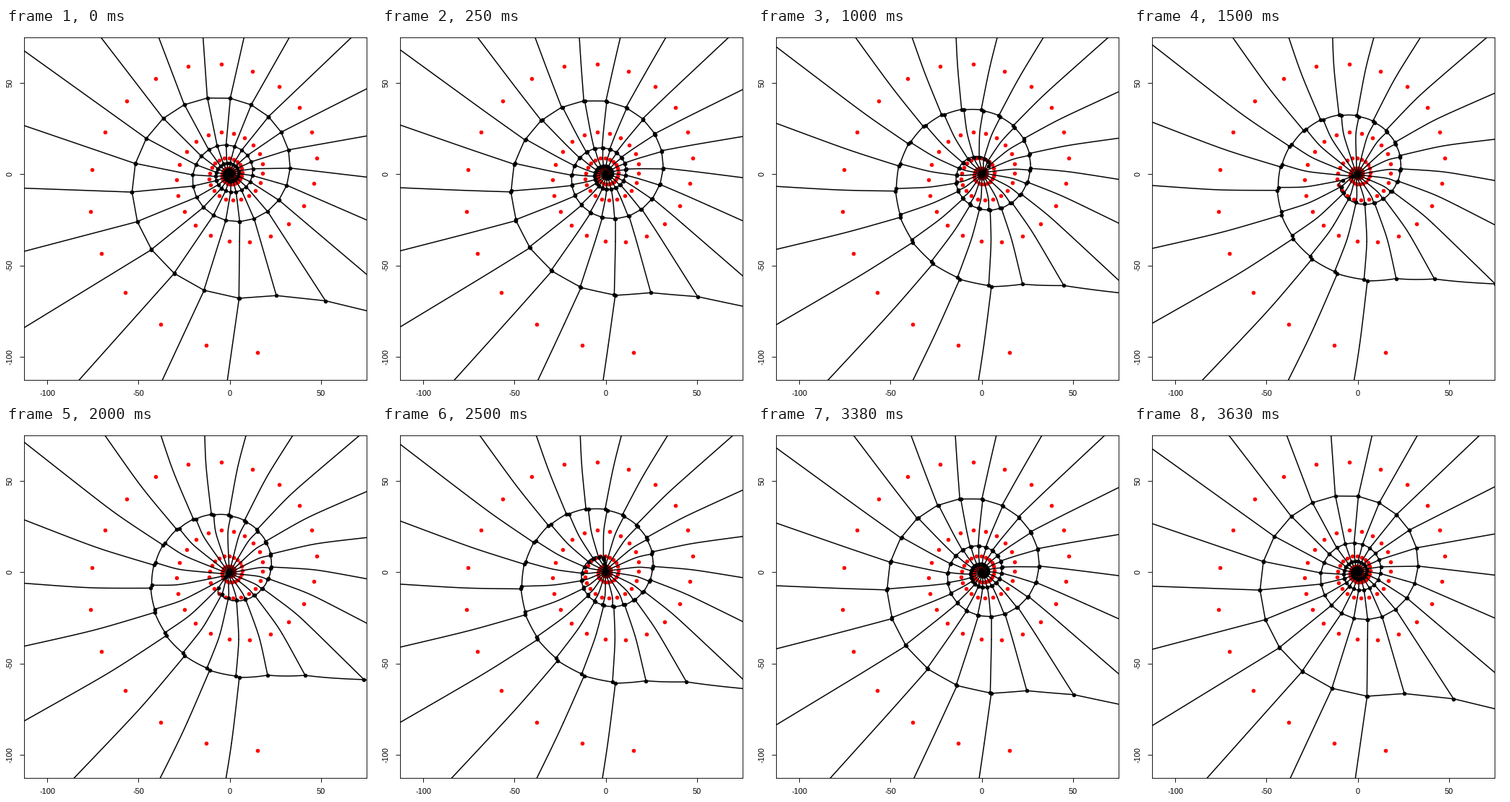
Animation, 512 px wide and 512 px high, one loop 3750 ms. Source, as a matplotlib script:

```python
import numpy as np
import matplotlib.pyplot as plt
from matplotlib.animation import FuncAnimation
from matplotlib.collections import LineCollection

# Additively weighted Voronoi diagram of a golden spiral;
# the weights grow along the spiral, then shrink again.

SIZE, DPI = 512, 72
LEFT, RIGHT, TOP, BOTTOM = 25.2, 499.4, 12.6, 486.8
FRAMES, INTERVAL = 30, 125
STEP = 0.25      # weight growth per frame
FAR = 1000.0     # unbounded cells are cut at this distance
DOT = 5.6

golden = (1 + 5 ** 0.5) / 2
theta = np.linspace(1, 30, 100)
radius = golden ** (theta / np.pi)
sites = radius[:, None] * np.column_stack([np.cos(theta), np.sin(theta)])

angles = np.linspace(0, 2 * np.pi, 1441)
rays = np.array([np.cos(angles), np.sin(angles)])


def visible_sites(weights):
    gap = np.linalg.norm(sites[:, None] - sites[None], axis=2)
    lead = weights[None] - weights[:, None]
    np.fill_diagonal(gap, np.inf)
    return ~np.any(lead >= gap, axis=1)


def cell_edges(i, pts, w):
    """Boundary pieces of cell i as (neighbour, polyline).

    The inverse distance to each bisector is a sinusoid of the
    direction, so the cell is the upper envelope of sinusoids.
    """
    offset = pts - pts[i]
    delta = w - w[i]
    power = (offset ** 2).sum(axis=1) - delta ** 2
    power[i] = 1
    coef = 2 * offset / power[:, None]
    inv = coef @ rays + (2 * delta / power)[:, None]
    inv[i] = -np.inf
    inv = np.vstack([inv, np.full(angles.size, 1 / FAR)])

    owner = inv.argmax(axis=0)
    cuts = np.flatnonzero(owner[1:] != owner[:-1])

    def point(angle, value):
        return pts[i] + np.column_stack([np.cos(angle), np.sin(angle)]) / value[:, None]

    corner_a, corner_v = [], []
    for c in cuts:
        a, b = owner[c], owner[c + 1]
        g0, g1 = inv[a, c] - inv[b, c], inv[a, c + 1] - inv[b, c + 1]
        t = g0 / (g0 - g1)
        corner_a.append(angles[c] + t * (angles[c + 1] - angles[c]))
        corner_v.append(inv[a, c] + t * (inv[a, c + 1] - inv[a, c]))

    starts = np.r_[0, cuts + 1]
    stops = np.r_[cuts + 1, angles.size]
    last = len(starts) - 1
    for n, (lo, hi) in enumerate(zip(starts, stops)):
        j = owner[lo]
        ang, val = angles[lo:hi], inv[j, lo:hi]
        if n > 0:
            ang, val = np.r_[corner_a[n - 1], ang], np.r_[corner_v[n - 1], val]
        if n < last:
            ang, val = np.r_[ang, corner_a[n]], np.r_[val, corner_v[n]]
        yield j, point(ang, val)

    # corners go last, under the key None
    if corner_a:
        yield None, point(np.array(corner_a), np.array(corner_v))


def diagram(level):
    weights = level * STEP * theta
    keep = visible_sites(weights)
    pts, w = sites[keep], weights[keep]
    edges, corners = [], []
    for i in range(len(pts)):
        for j, line in cell_edges(i, pts, w):
            if j is None:
                corners.append(line)
            elif i < j < len(pts):
                edges.append(line)
    corners = np.vstack(corners)
    corners = corners[np.abs(corners).max(axis=1) < 150]
    # each corner is met from several cells; keep it once
    _, first = np.unique(np.round(corners, 1), axis=0, return_index=True)
    return edges, corners[first]


diagrams = [diagram(k) for k in range(FRAMES // 2)]

plt.rcParams["font.family"] = "Liberation Sans"
fig = plt.figure(figsize=(SIZE / DPI, SIZE / DPI), dpi=DPI, facecolor="white")
ax = fig.add_axes([LEFT / SIZE, 1 - BOTTOM / SIZE,
                   (RIGHT - LEFT) / SIZE, (BOTTOM - TOP) / SIZE])

lo, hi = sites.min(), sites.max()
half = (hi - lo) / 2 * 1.1 * 1.08
limits = ((lo + hi) / 2 - half, (lo + hi) / 2 + half)
ticks = [-100, -50, 0, 50]
ax.set(xlim=limits, ylim=limits, xticks=ticks, yticks=ticks)
ax.set_xticklabels([str(t) for t in ticks])
ax.set_yticklabels([str(t) for t in ticks], rotation=90, va="center")
ax.tick_params(length=6.3, width=0.9, pad=8.3, labelsize=11)
for spine in ax.spines.values():
    spine.set_linewidth(0.9)

ax.scatter(*sites.T, s=DOT ** 2, color="red", lw=0, zorder=1, snap=False)
lines = LineCollection([], colors="black", linewidths=1.5,
                       capstyle="round", zorder=1.5)
ax.add_collection(lines, autolim=False)
dots = ax.scatter([], [], s=DOT ** 2, color="black", lw=0, zorder=2, snap=False)


def draw(k):
    edges, corners = diagrams[min(k, FRAMES - 1 - k)]
    lines.set_segments(edges)
    dots.set_offsets(corners)
    return lines, dots


anim = FuncAnimation(fig, draw, frames=FRAMES, interval=INTERVAL, repeat=True)
plt.show()
```
